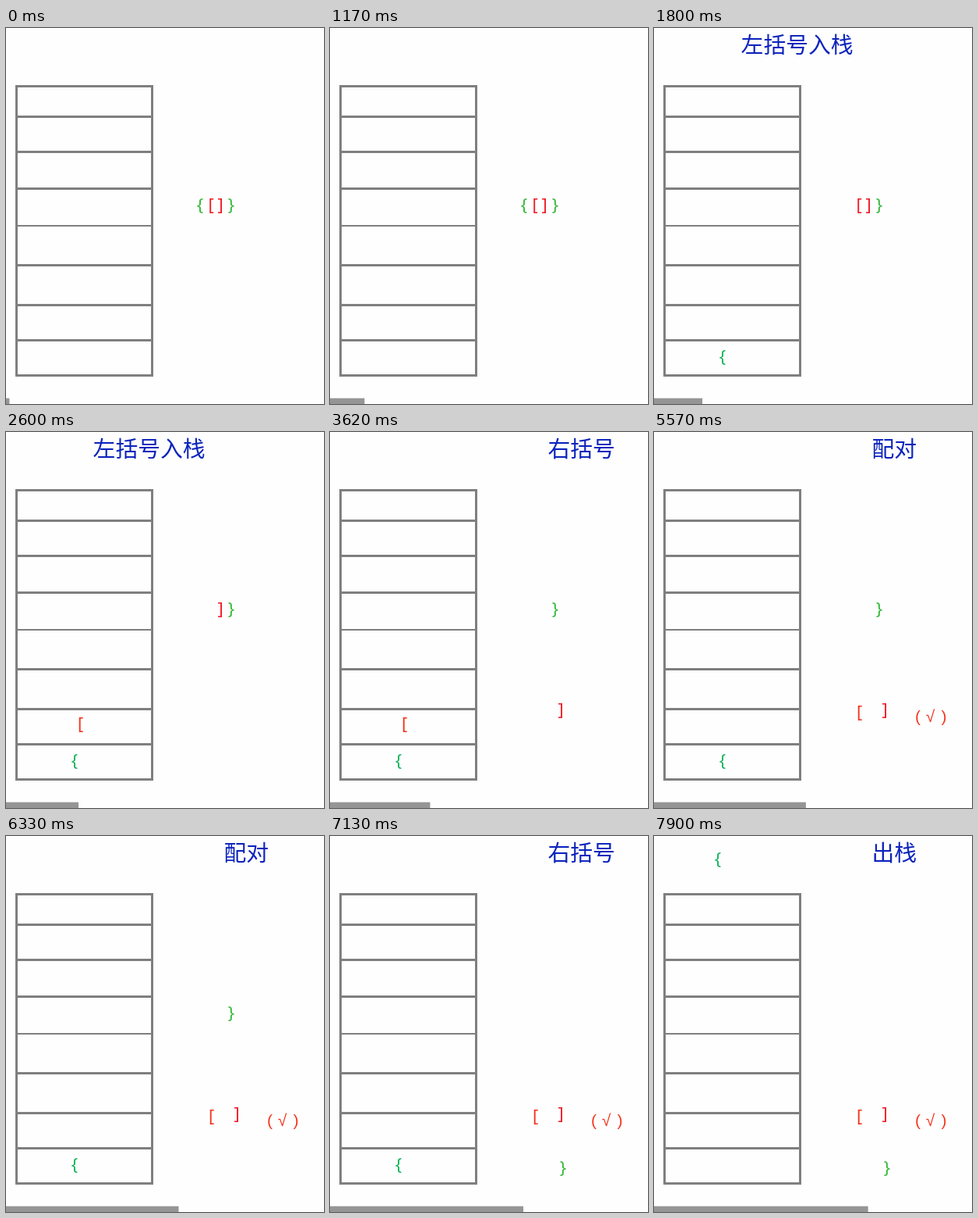
An HTML page for the animation above (8 s loop, 408 by 481 pixels).

```html
<!DOCTYPE html>
<html lang="zh-CN">
<head>
<meta charset="utf-8">
<title>Bracket matching with a stack</title>
<style>
  html, body { margin: 0; width: 100%; height: 100%; overflow: hidden; background: #fefefe; }
  svg { display: block; width: 100%; height: 100%; }
  .title { font: 28.8px "Noto Sans CJK SC", "Noto Sans CJK", sans-serif; fill: #0c24bc; }
  .thin { font-weight: 300; }
  .bracket { font: 300 22px "Noto Sans", sans-serif; text-anchor: middle; }
  .mark { font: 21px "Liberation Sans", sans-serif; text-anchor: middle; }
</style>
</head>
<body>
<svg id="stage" viewBox="0 0 408 481">
  <g fill="none" stroke="#7f7f7f" stroke-width="3">
    <rect x="13.5" y="74.5" width="174" height="370"/>
    <path d="M13 113.5H188M13 158.5H188M13 205.5H188M13 303.5H188M13 354.5H188M13 399.5H188"/>
    <path d="M13 253H188" stroke-width="2"/>
  </g>
  <rect id="bar" y="473.6" height="7.4" fill="#959595"/>
</svg>
<script>
const LOOP = 8000, TICKS = 62, BAR_STEP = 4.43;
const GREEN = '#38b93c', TEAL = '#16b45c', RED = '#f01c28', ORANGE = '#f5351f';
const stage = document.getElementById('stage');
const bar = document.getElementById('bar');
const items = [];

function addText(className, text, x, y, color, from, to = TICKS) {
  const el = document.createElementNS(stage.namespaceURI, 'text');
  el.setAttribute('class', className);
  el.setAttribute('x', x);
  el.setAttribute('y', y);
  if (color) el.setAttribute('fill', color);
  el.innerHTML = text.replace(/[栈对]/g, '<tspan class="thin">$&</tspan>');
  stage.append(el);
  items.push({ el, from, to });
}

const title = (text, x, from, to) => addText('title', text, x, 31.6, null, from, to);

// Each stop is { x, y, color, from }; it lasts until the next stop.
function bracket(char, ...stops) {
  stops.forEach(({ x, y, color, from }, i) =>
    addText('bracket', char, x, y + 6.2, color, from, stops[i + 1]?.from));
}

// Ticks at which each step of the algorithm begins
const push = 10, pushNext = 17, close = 23, pop = 31, match = 39, check = 43, closeLast = 51, popLast = 56;

title('左括号入栈', 111.6, push, close);
title('右括号', 279.5, close, pop);
title('出栈', 279.5, pop, match);
title('配对', 279.5, match, closeLast);
title('右括号', 279.5, closeLast, popLast);
title('出栈', 279.5, popLast);

bracket('{',
  { x: 249, y: 228, color: GREEN, from: 0 },
  { x: 88, y: 421.5, color: TEAL, from: push + 1 },
  { x: 82, y: 30.5, color: TEAL, from: popLast + 2 });
bracket('[',
  { x: 263, y: 228, color: RED, from: 0 },
  { x: 95.5, y: 374.5, color: ORANGE, from: pushNext },
  { x: 93.7, y: 24, color: ORANGE, from: pop + 3 },
  { x: 263.5, y: 359.5, color: ORANGE, from: match + 1 });
bracket(']',
  { x: 275, y: 228, color: RED, from: 0 },
  { x: 296, y: 357, color: RED, from: close + 1 });
bracket('}',
  { x: 289, y: 228, color: GREEN, from: 0 },
  { x: 299, y: 426, color: GREEN, from: closeLast + 1 });

addText('mark', '(', 338.5, 371, ORANGE, check);
addText('mark', '√', 354.5, 371, ORANGE, check);
addText('mark', ')', 372, 371, ORANGE, check);

function draw() {
  const tick = Math.floor(performance.now() % LOOP / LOOP * TICKS);
  bar.setAttribute('width', BAR_STEP * (tick + 1));
  for (const { el, from, to } of items) {
    el.style.display = tick >= from && tick < to ? '' : 'none';
  }
  requestAnimationFrame(draw);
}
draw();
</script>
</body>
</html>
```
